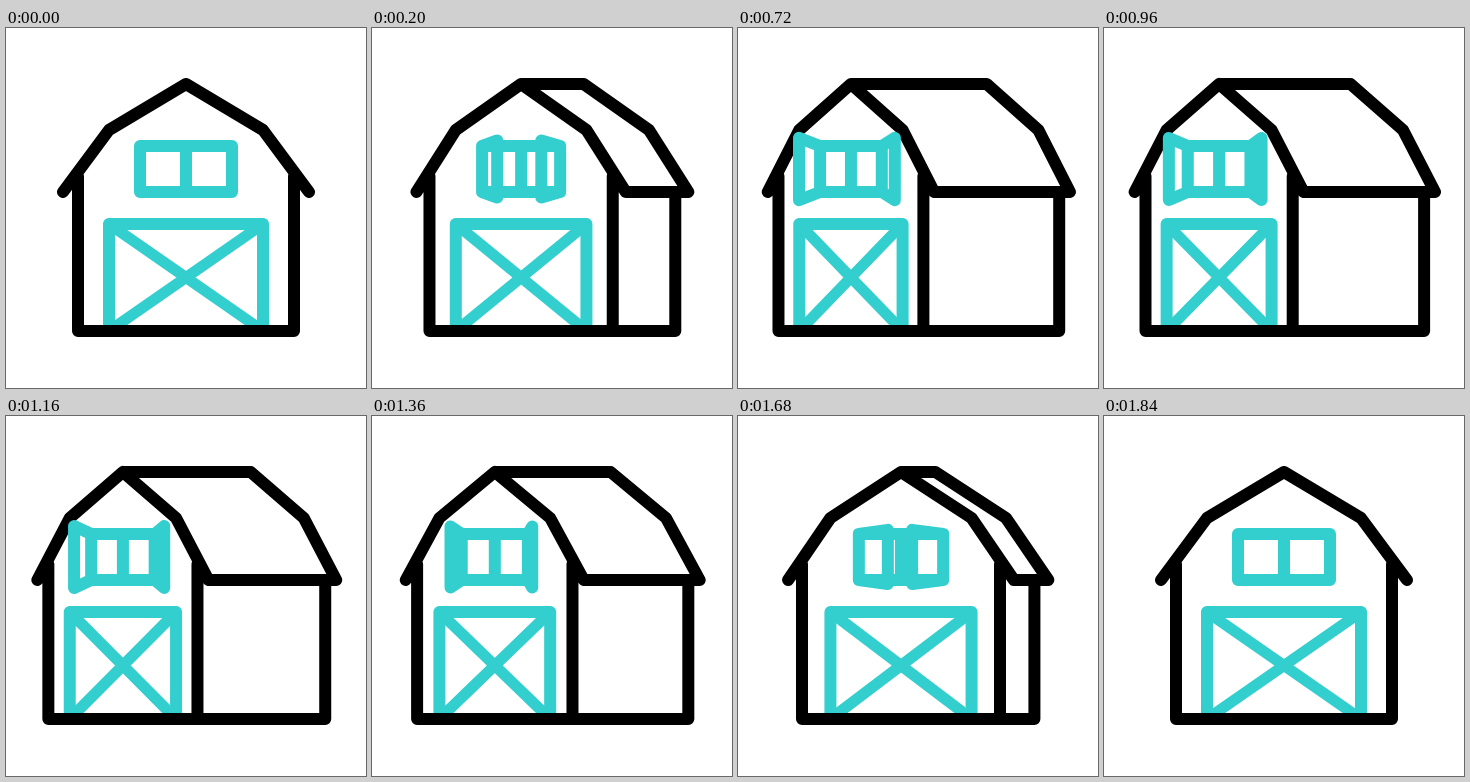
Write an HTML page that moves like this. It is 360 px wide and 360 px high and loops after 2.4 s.

```html
<!DOCTYPE html>
<html lang="en">
<head>
<meta charset="utf-8">
<title>Turning barn</title>
<style>
  html, body { margin: 0; width: 100%; height: 100%; overflow: hidden; background: #fff; }
  svg { display: block; width: 100vw; height: 100vh; }
  path { fill: none; stroke: #000; stroke-width: 12; stroke-linecap: round; stroke-linejoin: round; }
  .teal { stroke: #33cece; }
  #cross { stroke-width: 11; }
</style>
</head>
<body>
<svg viewBox="0 0 360 360">
  <path id="door" class="teal"/>
  <path id="cross" class="teal"/>
  <path id="barn"/>
  <path id="shutters" class="teal"/>
</svg>
<script>
const LOOP = 2400, STEP = 20;
const GROUND = 303, EAVE = 164, KNEE = 102, PEAK = 56;

// Turn of the barn: [time in ms, sideways shift of the front gable]
const KEYS = [[0, 0], [450, 69.5], [1325, 61.6], [1680, 17], [1840, 0], [LOOP, 0]];

function turnAt(t) {
  const i = KEYS.findIndex(key => key[0] > t);
  const [t0, a] = KEYS[i - 1], [t1, b] = KEYS[i];
  return a + (b - a) * (t - t0) / (t1 - t0);
}

const line = (...points) => "M" + points.map(p => p.map(v => v.toFixed(2))).join("L");
const set = (id, ...lines) => document.getElementById(id).setAttribute("d", lines.join(""));

function draw(turn) {
  const front = 180 - turn, back = 180 + 1.025 * turn;
  const shrink = 0.53 * turn;
  const scale = 1 - shrink / 108;
  const wall = 108 - shrink, eave = 123 - 1.12 * shrink;
  const knee = 77 * scale, door = 77 * scale, pane = 46 * scale;

  set("door", line([front - door, GROUND], [front - door, 196], [front + door, 196], [front + door, GROUND]));
  set("cross",
    line([front - door, 196], [front + door, GROUND]),
    line([front + door, 196], [front - door, GROUND]));

  set("barn",
    line([front - eave, EAVE], [front - knee, KNEE], [front, PEAK], [front + knee, KNEE], [front + eave, EAVE]),
    line([front, PEAK], [back, PEAK], [back + knee, KNEE], [back + eave, EAVE], [front + eave, EAVE]),
    line([front - wall, 148], [front - wall, GROUND], [back + wall, GROUND], [back + wall, EAVE]),
    line([front + wall, 148], [front + wall, GROUND]));

  // Each shutter swings on its hinge; its free edge grows as it nears the viewer
  const grow = Math.sqrt(turn);
  const shutter = (hinge, free) =>
    line([hinge, 118], [free, 118 - grow], [free, 164 + grow], [hinge, 164]) + "Z";
  const left = front - pane, right = front + pane;
  set("shutters",
    line([left, 118], [right, 118], [right, 164], [left, 164]) + "Z",
    line([front, 118], [front, 164]),
    shutter(left, left + 46 - turn),
    shutter(right, right - 46 + 0.88 * turn));
}

const start = performance.now();
function frame() {
  const t = (performance.now() - start) % LOOP;
  draw(turnAt(Math.floor(t / STEP) * STEP));
  requestAnimationFrame(frame);
}
frame();
</script>
</body>
</html>
```
